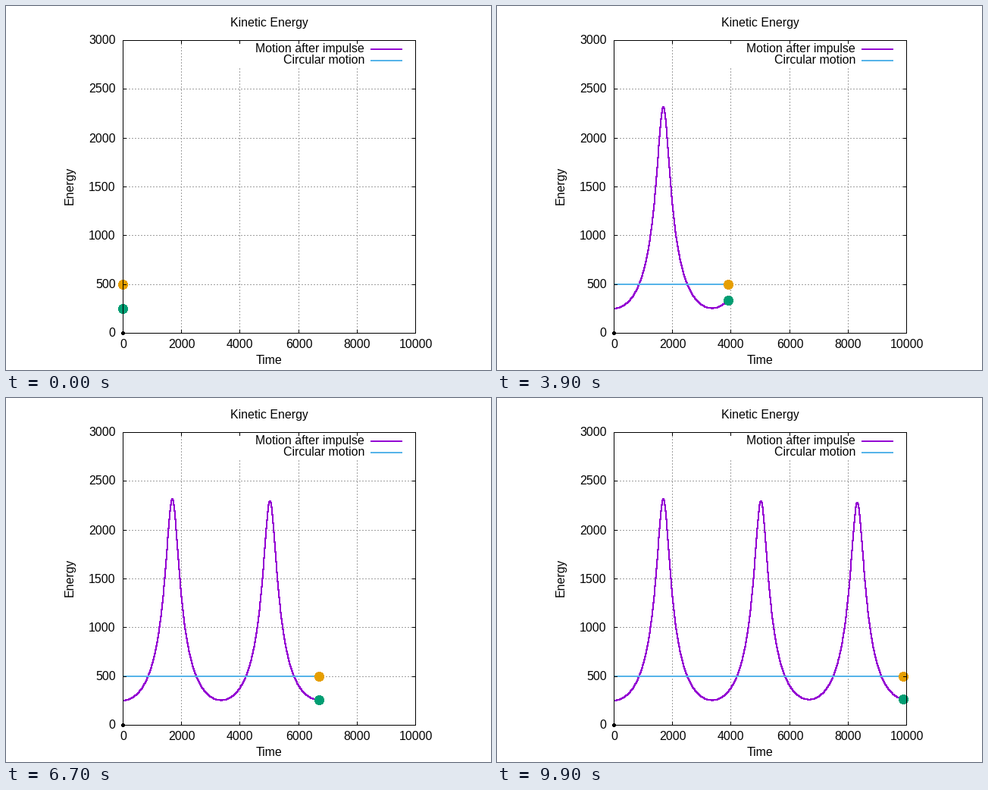
A matplotlib script for the animation above (10000 ms loop, 640x480 px).

```python
import numpy as np
import matplotlib.pyplot as plt
from matplotlib.animation import FuncAnimation
from matplotlib.patches import Circle

W, H, DPI = 640, 480, 80
PX = 72 / DPI                      # points per pixel
LEFT, RIGHT, TOP, BOTTOM = 154, 540, 45, 431
T_MAX, E_MAX = 10000, 3000
FRAMES, STEP, SUB = 100, 100, 5    # SUB: time between curve points
PURPLE, BLUE, GREEN, ORANGE = "#9400d3", "#56b4e9", "#009e73", "#e69f00"

plt.rcParams.update({"font.family": "Liberation Sans", "font.size": 16 * PX,
                     "text.hinting": "default", "path.simplify": False})

# Turning points of the slowly decaying orbit: time and kinetic energy
APSIS_T = np.array([0, 1693, 3360, 5030, 6675, 8324, 9955, 11590])
APSIS_E = np.array([250, 2316, 252.3, 2296, 259.5, 2278, 264, 2262])


def kinetic(t):
    """Kinetic energy on a Kepler ellipse, one half orbit at a time."""
    t = np.asarray(t, float)
    k = np.clip(np.searchsorted(APSIS_T, t, side="right") - 1, 0, len(APSIS_T) - 2)
    t0, t1 = APSIS_T[k], APSIS_T[k + 1]
    low = np.minimum(APSIS_E[k], APSIS_E[k + 1])
    high = np.maximum(APSIS_E[k], APSIS_E[k + 1])
    part = (t - t0) / (t1 - t0)
    mean = np.pi * np.where(k % 2 == 0, 1 - part, part)
    q = np.sqrt(high / low)
    ecc = (q - 1) / (q + 1)
    anom = mean + ecc * np.sin(mean)
    for _ in range(8):
        anom -= (anom - ecc * np.sin(anom) - mean) / (1 - ecc * np.cos(anom))
    c = ecc * np.cos(anom)
    return np.sqrt(low * high) * (1 + c) / (1 - c)


def to_x(t):
    return np.floor(LEFT + 0.05 + (RIGHT - LEFT) * np.asarray(t) / T_MAX + 0.5)


def to_y(e):
    return np.floor(BOTTOM - (BOTTOM - TOP) * np.asarray(e) / E_MAX + 0.5)


fig = plt.figure(figsize=(W / DPI, H / DPI), dpi=DPI, facecolor="white")
ax = fig.add_axes([0, 0, 1, 1])
ax.set_xlim(-0.5, W - 0.5)         # whole numbers are pixel centres
ax.set_ylim(H - 0.5, -0.5)
ax.axis("off")


def line(xs, ys, color="black", width=1, z=5, **kw):
    # Lines run along pixel edges, so they stay crisp without snapping
    return ax.plot(xs, ys, color=color, lw=width * PX, zorder=z, snap=False,
                   solid_capstyle="butt", solid_joinstyle="miter", **kw)[0]


def dot(x, y, r, color, z):
    return ax.add_patch(Circle((x, y), r, fc=color, ec="none", lw=0,
                               antialiased=False, zorder=z))


def label(x, y, s, ha="center", **kw):
    ax.text(x, y, s, ha=ha, va="baseline", zorder=6, **kw)


GRID = dict(color="#a0a0a0", z=1, linestyle=(0, (2, 2)), dash_capstyle="butt")
KEY_LEFT, KEY_BOTTOM, TIC = 305, 81, 4.5

for t in range(0, T_MAX + 1, 2000):
    x = to_x(t)
    label(x, 450.5, str(t))
    line([x, x], [BOTTOM + 0.5, BOTTOM - TIC])
    line([x, x], [TOP - 0.5, TOP + TIC])
    if 0 < t < T_MAX:
        line([x, x], [BOTTOM + 0.5, KEY_BOTTOM if x > KEY_LEFT else TOP], **GRID)

for e in range(0, E_MAX + 1, 500):
    y = to_y(e)
    label(144, y + 5, str(e), "right")
    line([LEFT - 0.5, LEFT + TIC], [y, y])
    line([RIGHT + 0.5, RIGHT - TIC], [y, y])
    if 0 < e < E_MAX:
        line([LEFT - 0.5, RIGHT], [y, y], **GRID)

for x in (LEFT, RIGHT):
    line([x, x], [TOP - 0.5, BOTTOM + 0.5])
for y in (TOP, BOTTOM):
    line([LEFT - 0.5, RIGHT + 0.5], [y, y])

label(346.5, 27, "Kinetic Energy")
label(346.5, 471.5, "Time")
label(88.5, 236.5, "Energy", rotation=90, rotation_mode="anchor")

for y, name, color in ((57, "Motion after impulse", PURPLE),
                       (72, "Circular motion", BLUE)):
    label(472.5, y + 4, name, "right")
    line([480.5, 522.5], [y - 0.5, y - 0.5], color, 2)

times = np.arange(0, T_MAX, SUB)
curve_x, curve_y = to_x(times), to_y(kinetic(times))
flat_y = to_y(500)

ellipse = line([], [], PURPLE, 2, 2, drawstyle="steps-post")
circular = line([], [], BLUE, 2, 3)
dot(LEFT, BOTTOM, 1.9, "black", 4)
green = dot(LEFT, BOTTOM, 5.75, GREEN, 4)
orange = dot(LEFT, flat_y, 5.75, ORANGE, 4.1)


def update(i):
    n = i * STEP // SUB + 1
    x, y = curve_x[n - 1], curve_y[n - 1]
    ellipse.set_data(curve_x[:n] - 0.5, curve_y[:n] - 0.5)
    circular.set_data([LEFT - 0.5, x], [flat_y - 0.5, flat_y - 0.5])
    green.set_center((x, y))
    orange.set_center((x, flat_y))
    return ellipse, circular, green, orange


anim = FuncAnimation(fig, update, frames=FRAMES, init_func=lambda: update(0),
                     interval=STEP, repeat=True, repeat_delay=0, blit=False)
plt.show()
```
